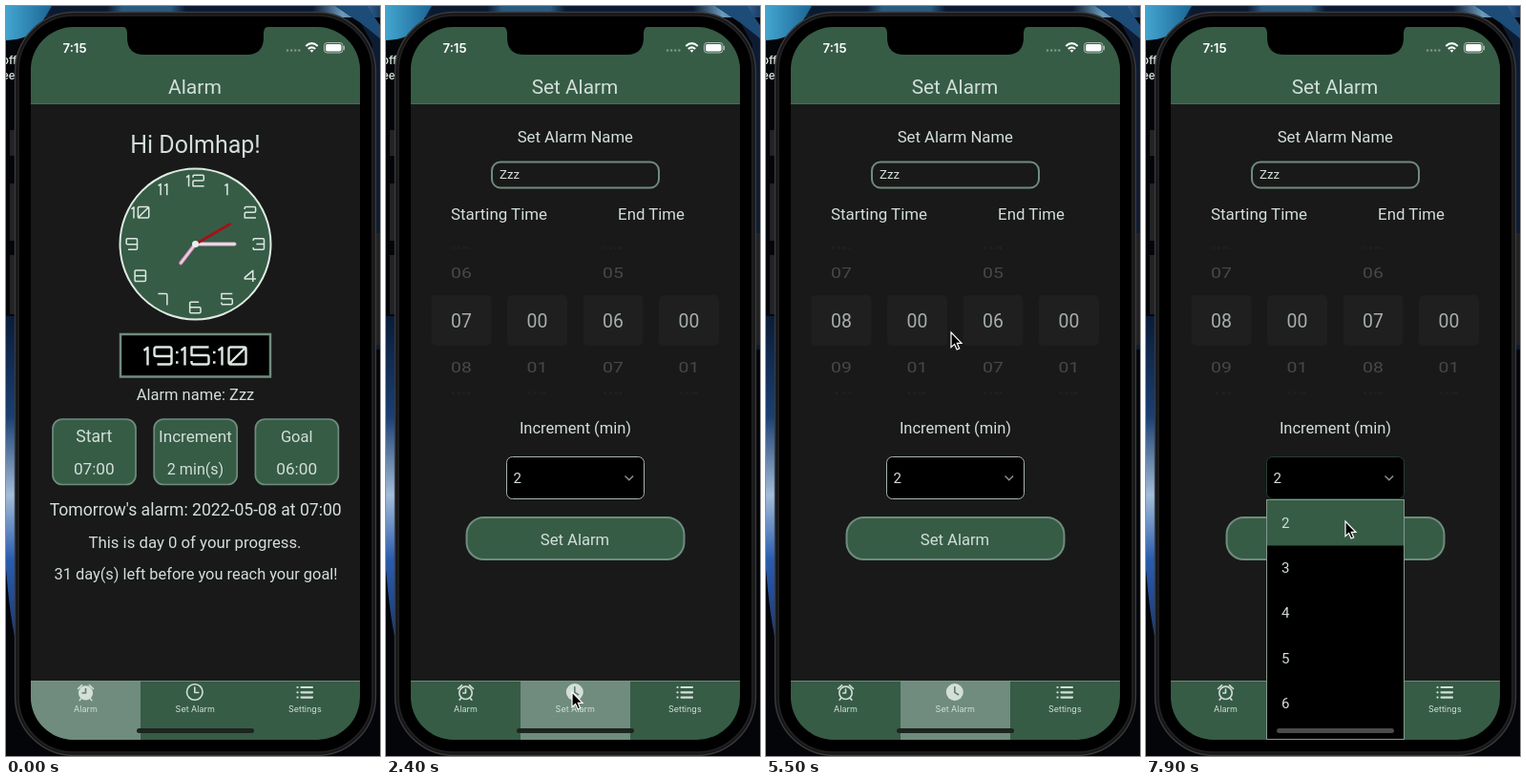
Recreate the animation shown at these times as an HTML page. Size 392 px wide and 786 px high, loop 8000 ms.

```html
<!DOCTYPE html>
<html lang="en">
<head>
<meta charset="utf-8">
<title>Alarm app</title>
<style>
  html, body { margin: 0; width: 100%; height: 100%; overflow: hidden; background: #000; }
  svg { display: block; width: 392px; height: 786px; }
  text { font-family: Roboto, "Open Sans", sans-serif; fill: #d3dfd8; text-anchor: middle; }
  .sys { font-family: Inter, "Liberation Sans", sans-serif; }
  .left { text-anchor: start; }
  .green { fill: #365c46; }
  .edge { stroke: #6f8c7e; stroke-width: 2; }
  .line { fill: none; stroke: #d3dfd8; stroke-width: 1.6; stroke-linecap: round; stroke-linejoin: round; }
  .solid { fill: #d3dfd8; }
  .lcd { fill: none; stroke: #dde8e1; stroke-width: 2.4; stroke-linejoin: round; }
</style>
</head>
<body>
<svg viewBox="0 0 392 786">
  <defs>
    <clipPath id="glass"><rect x="26" y="22" width="345" height="747" rx="45"/></clipPath>
    <linearGradient id="sky" x1="0" x2="1">
      <stop offset="0" stop-color="#2a78a6"/><stop offset=".12" stop-color="#0b1a30"/>
      <stop offset=".27" stop-color="#0b1a30"/><stop offset=".31" stop-color="#2a5a80"/>
      <stop offset=".44" stop-color="#2a5a80"/><stop offset=".48" stop-color="#0b1a34"/>
      <stop offset=".82" stop-color="#0b1a34"/><stop offset=".9" stop-color="#6c9cbd"/>
      <stop offset="1" stop-color="#17406c"/>
    </linearGradient>
    <linearGradient id="corner" x1="0" x2="1">
      <stop offset="0" stop-color="#43a5cf"/><stop offset="1" stop-color="#1b6594"/>
    </linearGradient>
    <linearGradient id="wave" x1="0" y1="0" x2="0" y2="1">
      <stop offset="0" stop-color="#0a1c38"/><stop offset=".28" stop-color="#1b3f72"/>
      <stop offset=".5" stop-color="#a3bdd9"/><stop offset=".68" stop-color="#2a5cae"/>
      <stop offset="1" stop-color="#10285a"/>
    </linearGradient>
  </defs>

  <g id="desk">
    <rect width="392" height="786" fill="#030508"/>
    <rect width="392" height="12" fill="url(#sky)"/>
    <path d="M0 0H48L36 20Q26 35 0 36Z" fill="url(#corner)"/>
    <path d="M345 0H378L392 22V360H384V40L372 18Z" fill="#0d1c33"/>
    <path d="M345 0H378L392 20V34L372 18Z" fill="#1d4c78"/>
    <path d="M0 325H26V700Q8 690 0 590Z" fill="url(#wave)"/>
    <text class="sys left" x="-4" y="61" font-size="11.5" font-weight="600">off</text>
    <text class="sys left" x="-4" y="77" font-size="11.5" font-weight="600">ees</text>
    <path d="M4 130h8v27h-8zM4 186h8v60h-8zM4 261h8v62h-8zM386 238h6v117h-6z" fill="#232325"/>
  </g>

  <g id="phone">
    <rect x="9.5" y="6.5" width="378" height="779" rx="62" fill="#161617" stroke="#3a3a3c" stroke-width="1.4"/>
    <rect x="13" y="10" width="371" height="772" rx="58" fill="#000" stroke="#222224" stroke-width="1.6"/>
  </g>

  <g clip-path="url(#glass)">
    <rect x="26" y="22" width="345" height="747" fill="#191919"/>
    <rect class="green" x="26" y="22" width="345" height="81"/>
    <path d="M26 102.5H371" stroke="#486f59"/>
    <g id="home"></g>
    <g id="form"></g>
    <rect class="green" x="26" y="707" width="345" height="62"/>
    <rect id="active" y="707" width="115" height="62" fill="#6f8c7e"/>
    <path d="M26 707.5H371" stroke="#7d9a8b" stroke-opacity=".75"/>
    <g id="tabs"></g>
    <rect x="137" y="757" width="123" height="5" rx="2.5" fill="#1d2420"/>
    <g id="menu"></g>
  </g>

  <g id="status">
    <path d="M121 21Q127 22 127 28V33Q127 51 145 51H252Q270 51 270 33V28Q270 22 276 21Z"/>
    <text class="sys" x="72" y="49" font-size="13.2" font-weight="600" style="fill:#fff">7:15</text>
    <path d="M295 46.5h.1m4 0h.1m4 0h.1m4 0h.1" stroke="#7f9889" stroke-width="2.4" stroke-linecap="round"/>
    <g fill="none" stroke="#fff" stroke-width="2.1">
      <path d="M314.3 42Q320.5 36.4 326.7 42M316.8 45Q320.5 41.8 324.2 45"/>
    </g>
    <path d="M318.6 46.6Q320.5 45 322.4 46.6L320.5 48.8Z" fill="#fff"/>
    <rect x="333.5" y="38.5" width="19.5" height="10.5" rx="3" fill="none" stroke="#a9bdb1"/>
    <rect x="335" y="40" width="16.5" height="7.5" rx="1.7" fill="#fff"/>
    <path d="M354.3 42.2v3.4" stroke="#a9bdb1" stroke-width="1.4" stroke-linecap="round"/>
  </g>

  <g id="touch" fill="none" stroke="#d8d8d8">
    <circle r="19.7"/>
    <circle r="22"/>
  </g>
  <path id="cursor" d="M0 0V15.6L3.6 12.4 6.1 18 8.7 16.9 6.3 11.4H11Z" fill="#000" stroke="#fff" stroke-width="1.2"/>
</svg>

<script>
const LOOP = 8000, STEP = 100;
const $ = id => document.getElementById(id);
const label = (x, y, s, size = 16.7, cls = '') =>
  `<text x="${x}" y="${y}" font-size="${size}" class="${cls}">${s}</text>`;
const box = (x, y, w, h, r, attrs) =>
  `<rect x="${x}" y="${y}" width="${w}" height="${h}" rx="${r}" ${attrs}/>`;

// Wide square numerals as strokes on a 20-unit height.
const strokes = {
  0: 'M4 1H18Q20 1 20 3V17Q20 19 18 19H4Q2 19 2 17V3Q2 1 4 1ZM3 18L19 2',
  1: 'M1.5 4.5L5.5 1.4V20',
  2: 'M2 5V3Q2 1 4 1H18Q20 1 20 3V8Q20 10 18 10H4Q2 10 2 12V19H20.5',
  3: 'M2 4.5V3Q2 1 4 1H18Q20 1 20 3V17Q20 19 18 19H4Q2 19 2 17V15.5M7 10H20',
  4: 'M15.5 20V1.2L2 13V15H20.5',
  5: 'M20 1H2V9.5H18Q20 9.5 20 12V17Q20 19 18 19H4Q2 19 2 17V15.5',
  6: 'M17 1H4Q2 1 2 3V17Q2 19 4 19H18Q20 19 20 17V11.5Q20 9.5 18 9.5H2',
  7: 'M2 1H15Q17 1 17 3V20',
  8: 'M4 1H18Q20 1 20 3V17Q20 19 18 19H4Q2 19 2 17V3Q2 1 4 1ZM2 10H20',
  9: 'M5 19H18Q20 19 20 17V3Q20 1 18 1H4Q2 1 2 3V8.5Q2 10.5 4 10.5H20',
  ':': 'M2 6.5h2.5M2 17h2.5'
};
const advance = c => c === '1' ? 10.5 : c === ':' ? 6 : 22.5;

function numerals(s, cx, cy, scale = 1) {
  let x = 0, out = '';
  for (const c of s) {
    out += `<path transform="translate(${x} 0)" d="${strokes[c]}"/>`;
    x += advance(c);
  }
  return `<g class="lcd" transform="translate(${cx} ${cy}) scale(${scale}) translate(${-x / 2} -10)">${out}</g>`;
}

function hand(deg, len, color, width, id = '') {
  return `<path id="${id}" d="M0 0V${-len}" transform="rotate(${deg})" stroke="${color}" stroke-width="${width}" stroke-linecap="round"/>`;
}

function buildHome() {
  let s = label(198, 92, 'Alarm', 21.1) + label(198.5, 154, 'Hi Dolmhap!', 25);
  s += '<circle class="green" cx="198.5" cy="249.5" r="79" stroke="#dfeae3" stroke-width="2"/>';
  for (let h = 1; h <= 12; h++) {
    const a = h * Math.PI / 6;
    s += numerals(String(h), 198.5 + 66.5 * Math.sin(a), 249.5 - 66.5 * Math.cos(a), .63);
  }
  s += '<g transform="translate(198.5 249.5)">' +
    hand(217.5, 25, '#d98fbd', 4) + hand(217.5, 25, '#edd3e2', 1.8) +
    hand(90, 41, '#dbb2cb', 4) + hand(90, 41, '#efe2ea', 2) +
    hand(60, 42, '#a80f18', 2.6, 'second') + '<circle r="3.5" fill="#e6efe9"/></g>';
  s += box(120, 344, 157, 44.5, 0, 'class="edge" style="stroke-width:2.5"') + '<g id="digits"></g>';
  s += label(198.5, 413, 'Alarm name: Zzz', 16.5);
  [['Start', '07:00', 17.6], ['Increment', '2 min(s)', 17.1], ['Goal', '06:00', 16.5]].forEach(([a, b, size], i) => {
    const x = 92.3 + i * 106.2;
    s += box(x - 43.3, 433, 87, 68.5, 10, 'class="green edge" style="stroke-width:1.7"') +
      label(x, 457, a, size) + label(x, 490.5, b, i === 1 ? 16.1 : 17.2);
  });
  s += label(198.7, 534, "Tomorrow's alarm: 2022-05-08 at 07:00", 17.6) +
    label(198, 567.5, 'This is day 0 of your progress.', 16.75) +
    label(199, 601, '31 day(s) left before you reach your goal!', 16.4);
  $('home').innerHTML = s;
}

const columns = [79, 158.5, 238, 317.5];

function buildForm() {
  let s = label(198, 92, 'Set Alarm', 20.8) + label(198.3, 143, 'Set Alarm Name') +
    box(111, 163.5, 175, 27, 9, 'class="edge" fill="#191919"') + label(119, 181, 'Zzz', 13.2, 'left') +
    label(118.5, 223.5, 'Starting Time', 16.9) + label(278, 223.5, 'End Time', 16.8);
  columns.forEach((x, i) => {
    s += box(x - 31.5, 303, 63, 53, 5, 'fill="#1f1f1f"') + `<g id="wheel${i}"></g>`;
  });
  s += label(198.5, 448, 'Increment (min)', 16.5) +
    box(126.5, 472.5, 144, 44, 6, 'id="select" stroke="#a9b5ae"') + label(133.5, 500, '2', 15, 'left') +
    '<path d="M250.5 492.5l4.3 4.3 4.3-4.3" fill="none" stroke="#8d948f" stroke-width="1.4"/>' +
    box(84.5, 536, 228, 44, 18, 'class="green edge"') + label(198, 564.5, 'Set Alarm', 16.6);
  $('form').innerHTML = s;
}

function buildMenu() {
  let s = box(126.5, 517.5, 144, 251, 0, 'stroke="#87998f"') + box(127, 518, 143, 47.5, 0, 'class="green"');
  for (let i = 0; i < 5; i++) s += label(142, 547 + i * 47.2, i + 2, 15, 'left');
  $('menu').innerHTML = s + box(137, 757, 123, 5, 2.5, 'fill="#4b4b4b"');
}

function tabIcons(page) {
  const ears = '<path class="line" d="M75.5 715.5l4-3.6M91.5 715.5l-4-3.6"/>';
  const alarm = page === 0
    ? '<circle class="solid" cx="83.5" cy="719.8" r="7.6"/><path class="line" d="M78.5 726l-1.3 1.6M88.5 726l1.3 1.6"/><path class="line" style="stroke:#5f7d6e" d="M83.5 715.5v4.5h-3.4"/>'
    : '<circle class="line" cx="83.5" cy="719.8" r="6.7"/><path class="line" d="M83.5 716v4h-2.8M78.5 725.5l-1.4 1.7M88.5 725.5l1.4 1.7"/>';
  const clock = page === 1
    ? '<circle class="solid" cx="197.8" cy="719" r="9"/><path class="line" style="stroke:#5f7d6e" d="M197.8 713.8v5.6l3.8 2.3"/>'
    : '<circle class="line" cx="197.8" cy="719" r="8.3"/><path class="line" d="M197.8 714v5.5h4"/>';
  const list = '<path class="line" style="stroke-width:2.2" d="M309.5 714h11.5M309.5 719.3h11.5M309.5 724.6h11.5M305.5 714h.1M305.5 719.3h.1M305.5 724.6h.1"/>';
  return ears + alarm + clock + list + label(83.5, 740, 'Alarm', 9, 'sys') +
    label(198.3, 740, 'Set Alarm', 9, 'sys') + label(313.3, 740, 'Settings', 9, 'sys');
}

// Items sit on a turning drum; pos is the value facing the viewer.
function wheel(i, pos) {
  const R = 77.3, unit = 39.8 * Math.PI / 180;
  let s = '';
  for (let k = Math.max(0, Math.ceil(pos - 2.2)); k <= pos + 2.2; k++) {
    const a = (k - pos) * unit, c = Math.cos(a);
    s += `<text transform="translate(${columns[i]} ${329.5 + R * Math.sin(a)}) scale(1 ${c})" y="7" font-size="19.4" opacity="${.05 + .7 * c ** 5}">${String(k).padStart(2, '0')}</text>`;
  }
  $('wheel' + i).innerHTML = s;
}

// Linear track through [time, ...values].
function track(keys, t) {
  let i = 0;
  while (i < keys.length - 1 && keys[i + 1][0] <= t) i++;
  const a = keys[i], b = keys[i + 1];
  if (!b || t <= a[0]) return a.slice(1);
  const p = (t - a[0]) / (b[0] - a[0]);
  return a.slice(1).map((v, n) => v + (b[n + 1] - v) * p);
}

const pointer = [
  [1300, 168, 412], [1400, 170, 424], [1600, 175, 480], [2000, 194, 700], [2200, 195, 719],
  [2500, 195, 719], [2800, 189, 650], [3400, 166, 400], [3700, 157, 354], [4100, 90, 350],
  [4200, 90, 350], [4800, 90, 312], [5000, 95, 314], [5500, 194, 342], [5700, 256, 350],
  [5800, 258, 350], [6600, 258.5, 314], [6800, 258.5, 314], [7000, 256, 350], [7400, 201, 496],
  [7600, 200, 500], [7700, 200, 506], [7900, 209, 540]
];
const startHour = [[4200, 7], [4800, 7.79], [4900, 8]];
const endHour = [[5800, 6], [6600, 6.747], [6700, 7]];
const presses = [[2200, 2300], [4200, 4900], [5700, 6700], [7500, 7600]];

const show = (id, on) => { $(id).style.display = on ? '' : 'none'; };
let last = -1;

function draw(t) {
  const page = t >= 2300 ? 1 : 0, open = t >= 7600;
  show('home', page === 0);
  show('form', page === 1);
  show('menu', open);
  $('active').setAttribute('x', 26 + 115 * page);
  $('tabs').innerHTML = tabIcons(page);
  $('select').setAttribute('stroke', open ? '#263f31' : '#a9b5ae');

  const sec = t < 800 ? 10 : t < 1800 ? 11 : 12;
  $('second').setAttribute('transform', `rotate(${sec * 6})`);
  $('digits').innerHTML = numerals('19:15:' + sec, 198.5, 366.5);

  wheel(0, track(startHour, t)[0]);
  wheel(1, 0);
  wheel(2, track(endHour, t)[0]);
  wheel(3, 0);

  const [x, y] = track(pointer, t);
  $('cursor').setAttribute('transform', `translate(${x} ${y})`);
  $('touch').setAttribute('transform', `translate(${x - .5} ${y + .5})`);
  show('cursor', t >= 1300);
  show('touch', presses.some(([a, b]) => t >= a && t < b));
}

function tick() {
  const t = Math.floor(performance.now() % LOOP / STEP) * STEP;
  if (t !== last) draw(last = t);
  requestAnimationFrame(tick);
}

buildHome();
buildForm();
buildMenu();
tick();
</script>
</body>
</html>
```
